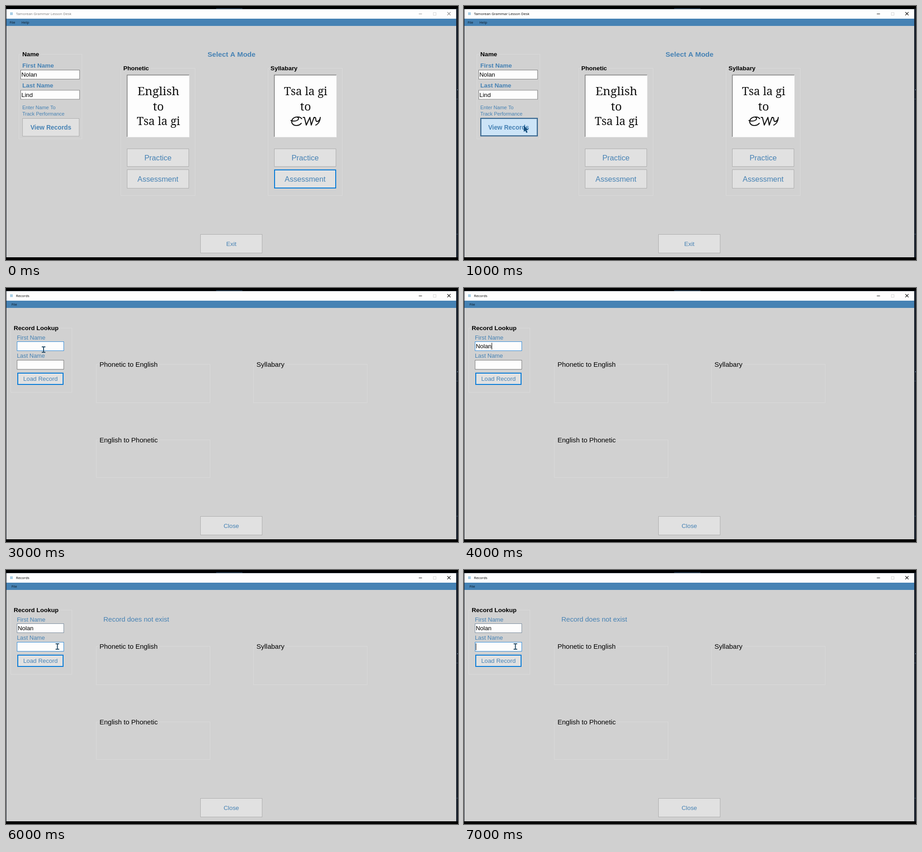
Recreate the animation shown at these times as an HTML page with a canvas. Size 998 by 561 pixels, loop 8 s.

```html
<!DOCTYPE html>
<html lang="en">
<head>
<meta charset="utf-8">
<title>Study tool records</title>
<style>
html, body { margin: 0; overflow: hidden; background: #000; }
canvas { display: block; }
</style>
</head>
<body>
<canvas id="stage" width="998" height="561"></canvas>
<script>
const ctx = document.getElementById('stage').getContext('2d');
const BLUE = '#4682b4', FOCUS = '#0078d7', INK = '#000', GREY = '#d1d1d1';
const SANS = '"Liberation Sans", sans-serif';
const UI = '"Open Sans", sans-serif';
const SERIF = '"Noto Serif", serif';
const FIRST = 'Nolan', LAST = 'Lind';

function fill(x, y, w, h, color) {
  ctx.fillStyle = color;
  ctx.fillRect(x, y, w, h);
}

function outline(x, y, w, h, color, line = 1) {
  ctx.strokeStyle = color;
  ctx.lineWidth = line;
  ctx.strokeRect(x + line / 2, y + line / 2, w - line, h - line);
}

function text(str, x, y, size, color = INK, { weight = 400, font = SANS, align = 'left' } = {}) {
  ctx.font = `${weight} ${size}px ${font}`;
  ctx.textAlign = align;
  ctx.fillStyle = color;
  ctx.fillText(str, x, y);
}

const bold = (str, x, y, size, color) => text(str, x, y, size, color, { weight: 700 });

function path(d, color, line) {
  const shape = new Path2D(d);
  ctx.lineWidth = line;
  ctx.strokeStyle = color;
  ctx.stroke(shape);
}

function button(label, x, y, w, h, size, { focus = false, weight = 400 } = {}) {
  fill(x, y, w, h, '#e1e1e1');
  outline(x, y, w, h, focus ? FOCUS : '#adadad', focus ? 2 : 1);
  text(label, x + w / 2, y + h / 2 + size * 0.35, size, BLUE, { weight, align: 'center' });
}

function input(value, x, y, w, border = '#7a7a7a') {
  fill(x, y, w, 21, '#fdfdfd');
  outline(x, y, w, 21, border);
  text(value, x + 2, y + 15, 13.3);
}

// Group frame whose top edge is broken by its caption.
function group(x, y, w, h, gapFrom, gapTo) {
  path(`M${gapFrom} ${y + .5}H${x + .5}v${h}h${w}v${-h}H${gapTo}`, '#dadada', 1);
}

function windowFrame(title, menu, active) {
  fill(0, 0, 998, 561, '#000');
  fill(0, 6, 998, 549, '#18202b');
  fill(464, 5, 58, 2, '#26394d');
  fill(996, 184, 2, 2, '#52677c');
  fill(995, 205, 2, 1, '#52677c');
  fill(995, 503, 2, 2, '#3a4c5e');
  fill(1, 7, 993, 548, GREY);
  fill(1, 7, 993, 21, '#fefefe');
  fill(1, 28, 993, 16, BLUE);
  fill(9, 14, 6, 6, '#a9cfe6');
  const tone = active ? '#111' : '#8c8c8c';
  text(title, 22, 20, 7.9, active ? INK : '#777', { font: UI });
  path('M911.5 17.5h7', tone, 1);
  outline(943, 14, 7, 7, '#d6d6d6');
  path('M974.5 13.5l7 7m0-7l-7 7', tone, 1.1);
  for (const [label, x] of menu) text(label, x, 39, 7.9, '#0c1822', { font: UI });
}

function card(x, lines) {
  fill(x, 152, 138, 138, '#fdfdfd');
  path(`M${x + .5} 289V152.5h137`, '#777', 1.5);
  path(`M${x + 1} 289.5h136.5V153`, '#eee', 1);
  for (const [str, y, size] of lines)
    text(str, x + 69.5, y, size, '#111', { font: SERIF, align: 'center' });
}

function modePanel(x, caption, gapTo, lines, focus) {
  group(x, 137, 164, 281, x + 4, gapTo);
  bold(caption, x + 6, 142, 13.4);
  card(x + 14, lines);
  button('Practice', x + 14, 315, 137, 40, 16.6);
  button('Assessment', x + 14, 361, 137, 42, 16.6, { focus });
}

function pressedRecords() {
  fill(36, 247, 127, 41, '#cce4f7');
  outline(36, 247, 127, 41, '#32648f', 2);
  outline(38, 249, 123, 37, '#a5bdd0');
  text('View Records', 98.5, 272.5, 13.8, BLUE, { weight: 700, align: 'center' });
}

function arrow(x, y) {
  const shape = new Path2D(`M${x} ${y}v14l3.2-2.8 2.4 5 2.8-1.2-2.4-5h4.2z`);
  ctx.fillStyle = '#164f7e';
  ctx.fill(shape);
}

function beam(x, y) {
  path(`M${x - 4} ${y - 6}h8m-4 0v12m-4 0h8`, '#234a66', 2);
}

function homeScreen(pressed) {
  windowFrame('Tamorean Grammar Lesson Desk', [['File', 8], ['Help', 34]], pressed);
  group(28, 106, 139, 187, 33, 76);
  bold('Name', 36, 111, 13.6);
  bold('First Name', 36, 136, 13.5, BLUE);
  input(FIRST, 32, 141, 131);
  bold('Last Name', 36, 180, 13.5, BLUE);
  input(LAST, 32, 185.5, 131);
  text('Enter Name To', 36, 228, 11, BLUE);
  text('Track Performance', 36, 242, 11, BLUE);
  bold('Select A Mode', 445, 112, 15.5, BLUE);
  modePanel(253, 'Phonetic', 319,
    [['English', 197, 26.3], ['to', 231, 26], ['Tsa la gi', 263, 24.7]], false);
  modePanel(578, 'Syllabary', 646,
    [['Tsa la gi', 197, 24.7], ['to', 231, 26]], !pressed);
  ctx.lineCap = ctx.lineJoin = 'round';
  path('M653 249q-3-4-9-4c-17 0-17 19-3 19q7 0 11-5M629 253q9 3 15-1q4-4 0-6', '#111', 2.1);
  path('M656 246h3l4 17 8-17 3 17 6-17h2', '#111', 2.2);
  path('M681 247q3-2 3 3q0 6 4 5q5-2 6-9q-1 13-10 17', '#111', 2.1);
  ctx.lineCap = 'butt';
  ctx.lineJoin = 'miter';
  button('Exit', 429, 504, 137, 42, 13.5);
  if (pressed) {
    pressedRecords();
    arrow(132, 264);
  } else {
    button('View Records', 36, 248, 126, 40, 13.8, { weight: 700 });
  }
}

function recordsScreen({ first = '', onLast, lastBorder, message, caret, pointer }) {
  windowFrame('Records', [['File', 12]], true);
  group(10, 88, 135, 142, 15, 119);
  bold('Record Lookup', 17, 93, 13.5);
  text('First Name', 24, 114, 12.9, BLUE);
  input(first, 24, 118, 104, onLast ? '#7a8c9e' : '#2f8ad8');
  text('Last Name', 24, 154, 12.8, BLUE);
  input('', 24, 159, 104, onLast ? '#2f8ad8' : lastBorder);
  button('Load Record', 25, 187, 102, 27, 13.3, { focus: true });
  group(199, 168, 251, 85, 204, 338);
  text('Phonetic to English', 206.5, 174, 15);
  group(546, 168, 251, 85, 551, 618);
  text('Syllabary', 553, 174, 15);
  group(199, 335, 251, 83, 204, 338);
  text('English to Phonetic', 206.5, 341, 15);
  button('Close', 429, 504, 137, 42, 13.3);
  if (message) text('Record does not exist', 215, 114, 15, BLUE);
  if (caret) fill(...caret, 1, 15, INK);
  if (pointer) beam(...pointer);
}

const onFirstField = [83, 136], onLastField = [113.5, 169];
const scenes = [
  () => homeScreen(false),
  () => homeScreen(true),
  () => recordsScreen({ lastBorder: '#555', pointer: onFirstField }),
  () => recordsScreen({ pointer: onFirstField }),
  () => recordsScreen({ first: FIRST, caret: [61, 121] }),
  () => recordsScreen({ first: FIRST, message: true, pointer: [83, 134.5] }),
  () => recordsScreen({ first: FIRST, message: true, onLast: true, pointer: onLastField }),
  () => recordsScreen({ first: FIRST, message: true, onLast: true, caret: [26, 162], pointer: onLastField }),
];

const start = performance.now();
function draw() {
  const seconds = Math.floor((performance.now() - start) / 1000);
  scenes[seconds % scenes.length]();
  requestAnimationFrame(draw);
}
draw();
</script>
</body>
</html>
```
